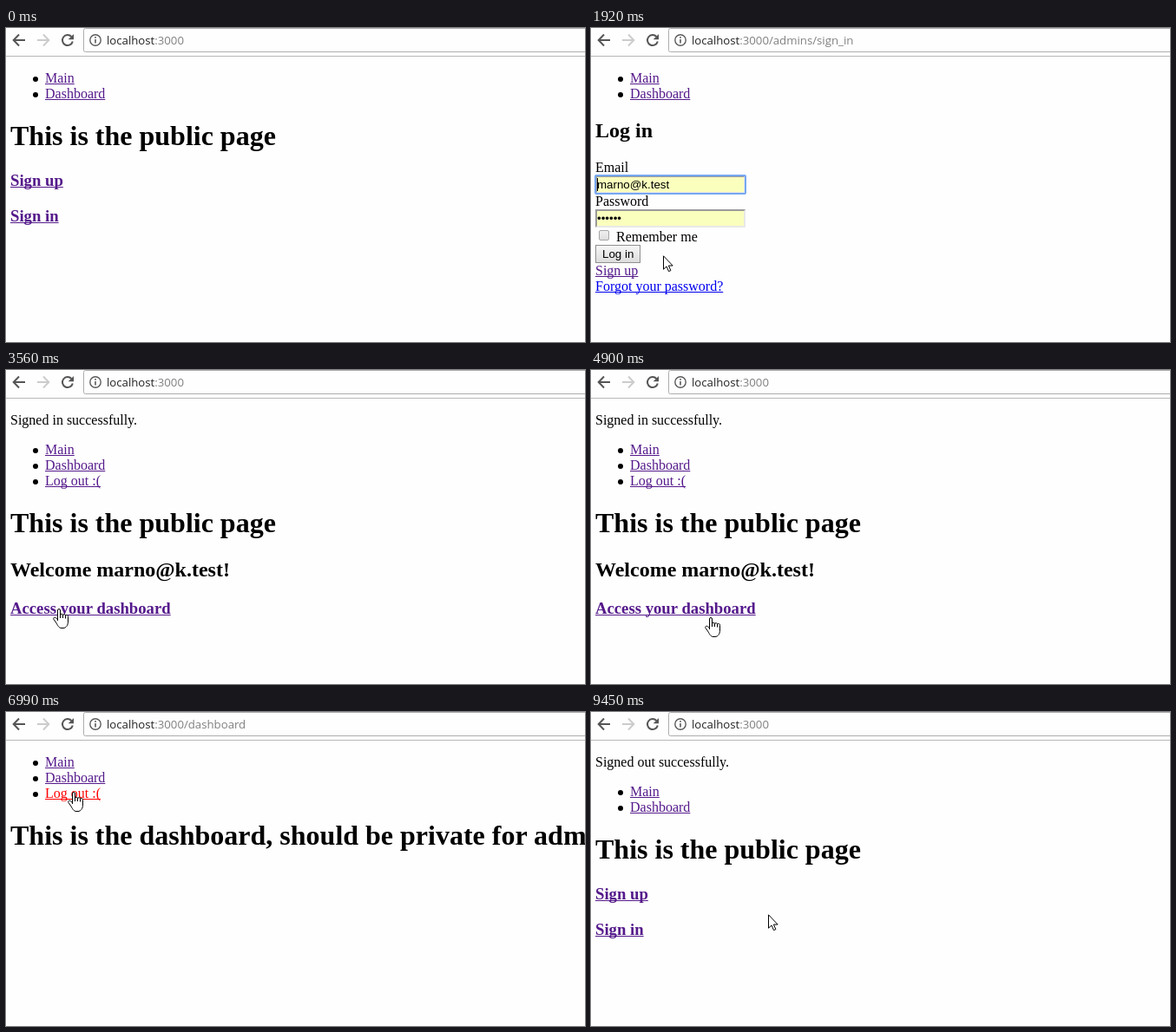
Animation, 667 px wide and 362 px high, one loop 9830 ms. Source, as an HTML page:

```html
<!DOCTYPE html>
<html lang="en">
<head>
<meta charset="utf-8">
<title>Sign-in walkthrough</title>
<style>
  html, body { margin: 0; width: 100%; height: 100%; overflow: hidden; background: #fefefe; }
  #stage { position: relative; width: 667px; height: 362px; overflow: hidden; background: #fefefe; color: #000; }
  #stage * { box-sizing: border-box; }
  #bar, #cursor, .page, .page > * { position: absolute; }
  #bar { left: 0; top: 0; }
  #url { position: absolute; left: 116px; top: 5px; font: 13.2px/18px "Open Sans", sans-serif; color: #808080; white-space: pre; }
  #url b { font-weight: 400; color: #222; }
  .page { inset: 0; visibility: hidden; font-family: "Liberation Serif", "Times New Roman", serif; }
  .page > span { white-space: pre; }
  .bold { font-weight: 700; }
  .link { color: #551a8b; text-decoration: underline; text-decoration-skip-ink: none; }
  .fresh { color: #00e; }
  .link.active { color: #f00; }
  .dot { width: 6px; height: 6px; border-radius: 50%; background: #000; }
  .sans { font-family: "Liberation Sans", Arial, sans-serif; }
  .field { left: 5px; width: 173px; height: 21px; border: 2px solid; border-color: #9a9a9a #e8e8e8 #e8e8e8 #9a9a9a; }
  .filled .field { background: #faffbd; }
  .value { visibility: hidden; }
  .filled .value { visibility: inherit; }
  .ring { border: 2px solid #76a7f0; border-radius: 2px; }
  .caret { width: 1px; height: 15px; background: #000; }
  .check { left: 9px; top: 233px; width: 12px; height: 12px; border: 1px solid #a6a6a6; border-radius: 2px; background: linear-gradient(#f0f0f0, #dedede); }
  .button { left: 5px; top: 250px; width: 52px; height: 21px; border: 1px solid #8f8f8f; background: linear-gradient(#f6f6f6, #ddd); }
  .button.down { background: linear-gradient(#d2d2d2, #e2e2e2); }
  #cursor { left: 0; top: 0; overflow: visible; }
</style>
</head>
<body>
<div id="stage">
  <svg id="bar" width="667" height="33" fill="none">
    <path stroke="#b8b8b8" d="M0 32.5H667"/>
    <rect x="89.5" y=".5" width="590" height="27" rx="2" stroke="#adadad"/>
    <g stroke-width="2">
      <path stroke="#555" d="M22 14H9M15 7.5L8.7 14L15 20.5"/>
      <path stroke="#ccc" d="M36 14H49M43 7.5L49.3 14L43 20.5"/>
      <g id="reload">
        <path stroke="#555" d="M75.4 10A6 6 0 1 0 76.8 15.5"/>
        <path fill="#555" d="M78 7V13.3H71.7z"/>
      </g>
      <path id="stop" stroke="#555" d="M65.5 8.5L76.5 19.5M76.5 8.5L65.5 19.5"/>
    </g>
    <circle cx="103" cy="14" r="6.2" stroke="#5a5a5a" stroke-width="1.4"/>
    <path stroke="#5a5a5a" stroke-width="1.6" d="M103 13V17.5M103 10V11.7"/>
  </svg>
  <div id="url"><b>localhost</b>:3000<span id="path"></span></div>
  <svg id="cursor" width="24" height="26" fill="#fff" stroke="#000">
    <path id="arrow" d="M.5 .8V16.2L4 12.9L6.5 18.6L8.9 17.6L6.4 12H11.2z"/>
    <g id="hand" transform="translate(-6 0)">
      <path d="M5.5 14V2a1.5 1.5 0 0 1 3 0V7.5a1.5 1.5 0 0 1 3 .4a1.5 1.5 0 0 1 3 .7a1.5 1.5 0 0 1 3 1V15C17.5 19.5 15 22.5 12 22.5H10C6.5 22.5 5.5 19 3.5 16L.9 12.3a1.5 1.5 0 0 1 2.3-1.8L5.5 12.7"/>
      <path d="M8.5 7V11M11.5 8V11M14.5 8.5V11.5"/>
    </g>
    <path id="beam" fill="none" d="M-3 -7.5H-1L.5 -6.5L2 -7.5H4M.5 -6.5V7.5M-3 8.5H-1L.5 7.5L2 8.5H4"/>
  </svg>
</div>
<script>
const LOOP = 9830, STEP = 74;
const EMAIL = 'marno@k.test';
const $ = id => document.getElementById(id);

function add(page, cls, html = '', tag = 'div') {
  const el = document.createElement(tag);
  el.className = cls;
  el.innerHTML = html;
  page.appendChild(el);
  return el;
}
function place(el, x, y, w, h) {
  el.style.left = x + 'px';
  el.style.top = y + 'px';
  if (w) { el.style.width = w + 'px'; el.style.height = h + 'px'; }
  return el;
}
// Text is placed by its baseline.
function text(page, x, base, size, str, cls = 'txt') {
  const el = add(page, cls, str, 'span');
  el.style.fontSize = size + 'px';
  return place(el, x, base - Math.round(size * .891));
}
function makePage(menuBase, menu, notice) {
  const page = document.createElement('div');
  page.className = 'page';
  $('stage').insertBefore(page, $('cursor'));
  if (notice) text(page, 5, 63, 16, notice);
  menu.forEach((item, i) => {
    const base = menuBase + 18 * i;
    place(add(page, 'dot'), 31, base - 7);
    text(page, 45, base, 16, item, 'link');
  });
  return page;
}
const h1 = (page, base, str) => text(page, 5, base, 32, str, 'txt bold');
const h2 = (page, base, str) => text(page, 5, base, 24, str, 'txt bold');
const h3 = (page, base, str) => text(page, 5, base, 18.72, str, 'link bold');

const guest = ['Main', 'Dashboard'], member = [...guest, 'Log out :('];

function publicPage(dy, notice) {
  const page = makePage(63 + dy, guest, notice);
  h1(page, 135 + dy, 'This is the public page');
  h3(page, 182 + dy, 'Sign up');
  h3(page, 223 + dy, 'Sign in');
  return page;
}
const home = publicPage(0);
const bye = publicPage(34, 'Signed out successfully.');

const welcome = makePage(97, member, 'Signed in successfully.');
h1(welcome, 187, 'This is the public page');
h2(welcome, 238, `Welcome ${EMAIL}!`);
h3(welcome, 281, 'Access your dashboard');

const dash = makePage(63, member);
h1(dash, 153, 'This is the dashboard, should be private for admins');

const login = makePage(63, guest);
h2(login, 126, 'Log in');
text(login, 5, 166, 16, 'Email');
text(login, 5, 205, 16, 'Password');
place(add(login, 'field txt'), 5, 170);
place(add(login, 'field txt'), 5, 209);
const ring = place(add(login, 'ring'), 4, 169, 175, 23);
const caret = place(add(login, 'caret'), 7, 173);
text(login, 7, 185, 13.333, EMAIL, 'value sans');
text(login, 7, 224, 13.333, '••••••', 'value sans');
let wave = 'M0 2.5';
for (let x = 2; x <= 36; x += 2) wave += `L${x} ${x % 4 ? .5 : 2.5}`;
const squiggle = place(add(login, '',
  `<svg width="38" height="3" fill="none" stroke="#e33" style="display:block"><path d="${wave}"/></svg>`), 7, 186);
add(login, 'check');
text(login, 29, 246, 16, 'Remember me');
const button = add(login, 'button');
const buttonRing = place(add(login, 'ring'), 4, 249, 54, 24);
text(login, 13, 265, 13.333, 'Log in', 'sans');
text(login, 5, 285, 16, 'Sign up', 'link');
text(login, 5, 303, 16, 'Forgot your password?', 'link fresh');

// Each visit: mouse down, request sent, page shown. A submit shows the stop icon.
const visits = [
  { press: 0, go: 0, show: 0, page: home, path: '' },
  { press: 1100, go: 1250, show: 1550, page: login, path: '/admins/sign_in' },
  { press: 2820, go: 2960, show: 3340, page: welcome, path: '', submit: true },
  { press: 5120, go: 5200, show: 5340, page: dash, path: '/dashboard' },
  { press: 6990, go: 7060, show: 7200, page: bye, path: '', submit: true }
];
const submitAt = visits[2].press, fillAt = 1920, blinkAt = 2140;

// Each glide runs from where the last one ended, through its points.
const glide = (start, end, ...points) => ({ start, end, points });
const origin = [196, 350];
const glides = [
  glide(580, 1100, origin, [43, 225]),
  glide(1550, 1690, [70, 252]),
  glide(1920, 2000, [95, 272]),
  glide(2140, 2660, [43, 260]),
  glide(3340, 4080, [104, 315]),
  glide(4240, 4900, [152, 316], [137, 285]),
  glide(4980, 5200, [135, 277]),
  glide(5570, 5930, [204, 312], [123, 223]),
  glide(6000, 6400, [77, 92]),
  glide(7340, 7500, [194, 168]),
  glide(7580, 8310, [199, 190], [187, 223]),
  glide(8470, 8530, [206, 222]),
  glide(9160, 9450, [204, 233])
];

function pointer(t) {
  let from = origin, now = null;
  for (const g of glides) {
    if (g.start > t) break;
    if (now) from = now.points[now.points.length - 1];
    now = g;
  }
  if (!now) return from;
  const { start, end, points } = now;
  const gaps = Math.round((end - start) / STEP);
  const k = Math.min(gaps, Math.floor((t - start) / (end - start) * gaps + .01)) + 1;
  const s = k / (gaps + 1) * points.length;
  const i = Math.min(points.length - 1, Math.floor(s));
  const a = i ? points[i - 1] : from, b = points[i];
  return a.map((v, n) => Math.round(v + (b[n] - v) * (s - i)));
}
function hit(page, x, y) {
  return [...page.children].find(el => /\b(txt|link)\b/.test(el.className) &&
    x >= el.offsetLeft && x <= el.offsetLeft + el.offsetWidth &&
    y >= el.offsetTop && y <= el.offsetTop + el.offsetHeight + 1);
}
const show = (el, on) => { el.style.visibility = on ? 'inherit' : 'hidden'; };

function draw(t) {
  const last = key => visits.filter(v => v[key] <= t).pop();
  const shown = last('show'), sent = last('go'), held = last('press');
  const page = shown.page;
  const busy = sent !== shown && sent.submit;
  for (const v of visits) v.page.style.visibility = v === shown ? 'visible' : 'hidden';
  $('path').textContent = busy ? shown.path : sent.path;
  show($('reload'), !busy);
  show($('stop'), busy);

  login.classList.toggle('filled', t >= fillAt);
  show(ring, t < submitAt);
  show(caret, t < blinkAt);
  show(squiggle, t >= blinkAt);
  show(buttonRing, t >= submitAt);
  button.classList.toggle('down', t >= submitAt && t < submitAt + STEP);

  const [x, y] = pointer(t);
  const over = hit(page, x, y);
  const shape = !over ? 'arrow' : over.classList.contains('link') ? 'hand' : 'beam';
  const visible = t >= glides[0].start;
  for (const id of ['arrow', 'hand', 'beam']) show($(id), visible && id === shape);
  $('cursor').style.transform = `translate(${x}px, ${y}px)`;

  for (const el of document.querySelectorAll('.active')) el.classList.remove('active');
  if (shape === 'hand' && held !== sent) over.classList.add('active');
}
const begin = performance.now();
function tick() {
  draw((performance.now() - begin) % LOOP);
  requestAnimationFrame(tick);
}
draw(0);
requestAnimationFrame(tick);
</script>
</body>
</html>
```
